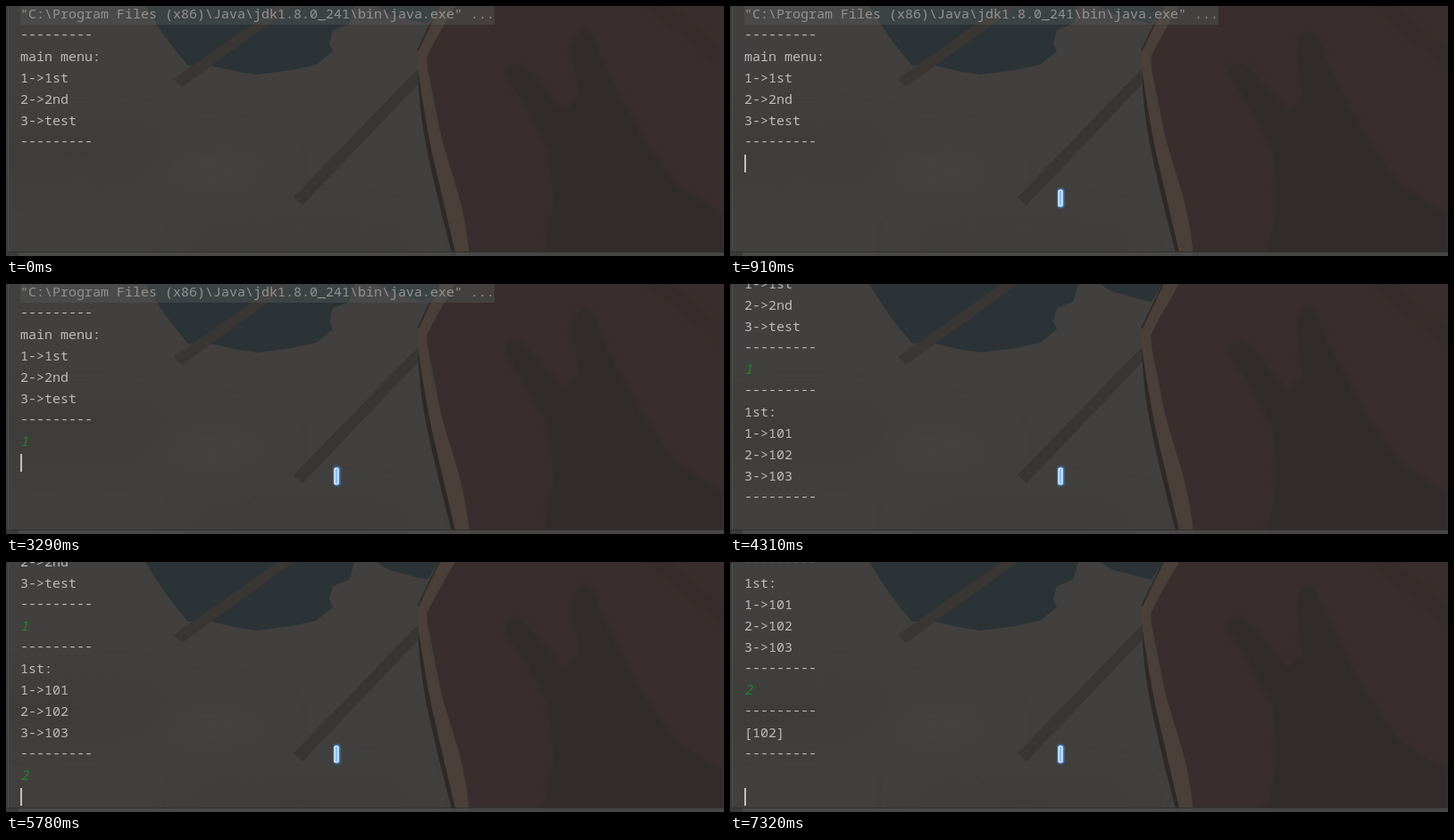
Animation, 804 px wide and 281 px high, one loop 8 s. Source, as an HTML page:

```html
<!DOCTYPE html>
<html lang="en">
<head>
<meta charset="utf-8">
<title>Console menu</title>
<style>
html, body { margin: 0; width: 804px; height: 281px; overflow: hidden; background: #40403e; }
svg { display: block; }
filter { color-interpolation-filters: sRGB; }
text { font: 15px "Noto Sans Mono", "DejaVu Sans Mono", monospace; fill: #bbb; white-space: pre; }
.command { fill: #929391; }
.input { fill: #23842a; font-style: italic; }
</style>
</head>
<body>
<svg width="804" height="281" viewBox="0 0 804 281">
  <defs>
    <filter id="soft" x="-50%" y="-50%" width="200%" height="200%"><feGaussianBlur stdDeviation="18"/></filter>
    <filter id="blur"><feGaussianBlur stdDeviation="2.5"/></filter>
    <filter id="edge"><feGaussianBlur stdDeviation=".6"/></filter>
    <filter id="glow" x="-200%" y="-50%" width="500%" height="200%"><feGaussianBlur stdDeviation="1.2"/></filter>
  </defs>

  <!-- painted backdrop -->
  <rect width="804" height="281" fill="#41403e"/>
  <g filter="url(#soft)">
    <ellipse cx="80" cy="165" rx="110" ry="25" fill="#3d3c3a"/>
    <ellipse cx="230" cy="185" rx="70" ry="24" fill="#434240"/>
    <ellipse cx="330" cy="265" rx="130" ry="18" fill="#3e3d3b"/>
  </g>
  <g filter="url(#edge)">
    <path fill="#2b3337" d="M156 0Q176 35 204 67L230 67 260 74 281 77 320 72 347 66 366 51 362 42 366 27 384 20 387 11 390 0Z"/>
    <path fill="#2b3337" d="M415 0Q425 9 438 11L458 17 472 20 484 0Z"/>
    <path fill="#393633" d="M304 0H322L197 91 188 82Z"/>
    <path fill="#383634" d="M461 71L465 84 332 224 322 215Z"/>
    <path fill="#392e2d" d="M500 0H804V281H517L490 160 470 60Z"/>
  </g>
  <g filter="url(#blur)">
    <path fill="#322b2b" d="M557 75Q560 62 572 64 585 67 600 90L625 118 640 102 633 52Q636 27 648 26 660 28 668 60L688 100 715 150 750 200 804 235V281H600L612 220 606 160 580 112Z"/>
    <path fill="#352c2b" d="M715 0L804 72V50L745 0Z"/>
  </g>
  <g filter="url(#edge)">
    <path fill="#4a4039" d="M484 0L460 50Q461 110 471 160T500 281H519Q515 235 500 190L485 140Q472 95 471 55L503 0Z"/>
    <path fill="#2e2927" d="M461 70Q462 115 471 160T500 281H504Q491 225 477 165 468 120 461 70Z"/>
    <path fill="none" stroke="#332d2a" stroke-width="2" d="M485 0L461 50"/>
  </g>

  <g id="scroll">
    <rect x="16" y="-4" width="531" height="25" fill="#555a59" opacity=".42"/>
    <g id="lines"></g>
    <rect id="caret" width="2" height="20" fill="#bfbfbd"/>
  </g>

  <!-- panel frame -->
  <path fill="#3a3c3c" d="M0 0H2V281H0Z"/>
  <path fill="#4b4e4d" d="M2 0H3V276H2Z"/>
  <path fill="#303130" d="M0 276H804V277H0Z"/>
  <path fill="#4b4a49" opacity=".85" d="M14 277H804V281H14Z"/>
  <path fill="#393a3a" d="M0 277H14V281H0Z"/>

  <g id="pointer">
    <rect x="-3" y="-10.5" width="7" height="21" rx="2" fill="#3f97f2" filter="url(#glow)"/>
    <rect x="-2" y="-9" width="4" height="18" rx="1" fill="#8fbcec" stroke="#fff" stroke-width="1.2"/>
  </g>
</svg>
<script>
const LOOP = 8000, ROW = 24, RULE = "---------";
const $ = id => document.getElementById(id);

const content = [
  '"C:\\Program Files (x86)\\Java\\jdk1.8.0_241\\bin\\java.exe" ...',
  RULE, "main menu:", "1->1st", "2->2nd", "3->test", RULE,
  "1", RULE, "1st:", "1->101", "2->102", "3->103", RULE,
  "2", RULE, "[102]", RULE
];

// start time, caret row, caret column
const states = [
  [0, 7, 0], [2830, 7, 1], [3290, 8, 0], [3530, 14, 0],
  [5380, 14, 1], [5780, 15, 0], [6000, 18, 0], [7320, 19, 0]
];
const caretOff = [[0, 750], [1290, 1750], [2290, 2750], [4310, 4770], [5300, 5380], [6780, 7240]];

const rows = content.map((string, i) => {
  const row = document.createElementNS("http://www.w3.org/2000/svg", "text");
  row.textContent = string;
  row.setAttribute("x", 16);
  row.setAttribute("y", (string === RULE ? 13 : 14) + ROW * i);
  if (i === 0) row.setAttribute("class", "command");
  if (/^\d$/.test(string)) row.setAttribute("class", "input");
  return $("lines").appendChild(row);
});

const show = (node, on) => node.setAttribute("visibility", on ? "visible" : "hidden");
const move = (node, x, y) => node.setAttribute("transform", `translate(${x} ${y})`);

function draw(t) {
  const [, line, column] = states.filter(s => s[0] <= t).pop();
  rows.forEach((row, i) => show(row, i < line + column));
  move($("scroll"), 0, line < 14 ? 0 : -81 - ROW * (line - 14));
  move($("caret"), 16 + 8 * column, ROW * line - 1);
  show($("caret"), !caretOff.some(([from, to]) => t >= from && t < to));

  // the pointer glides in by steps and slows down
  const step = Math.min(10, Math.max(0, Math.floor((t - 110) / 80)));
  const rest = (1 - step / 10) ** 4.2;
  move($("pointer"), Math.round(370 + 338 * rest), Math.round(216 + 62 * rest));
  show($("pointer"), t >= 120);
}

const start = performance.now();
function tick() {
  draw((performance.now() - start) % LOOP);
  requestAnimationFrame(tick);
}
tick();
</script>
</body>
</html>
```
